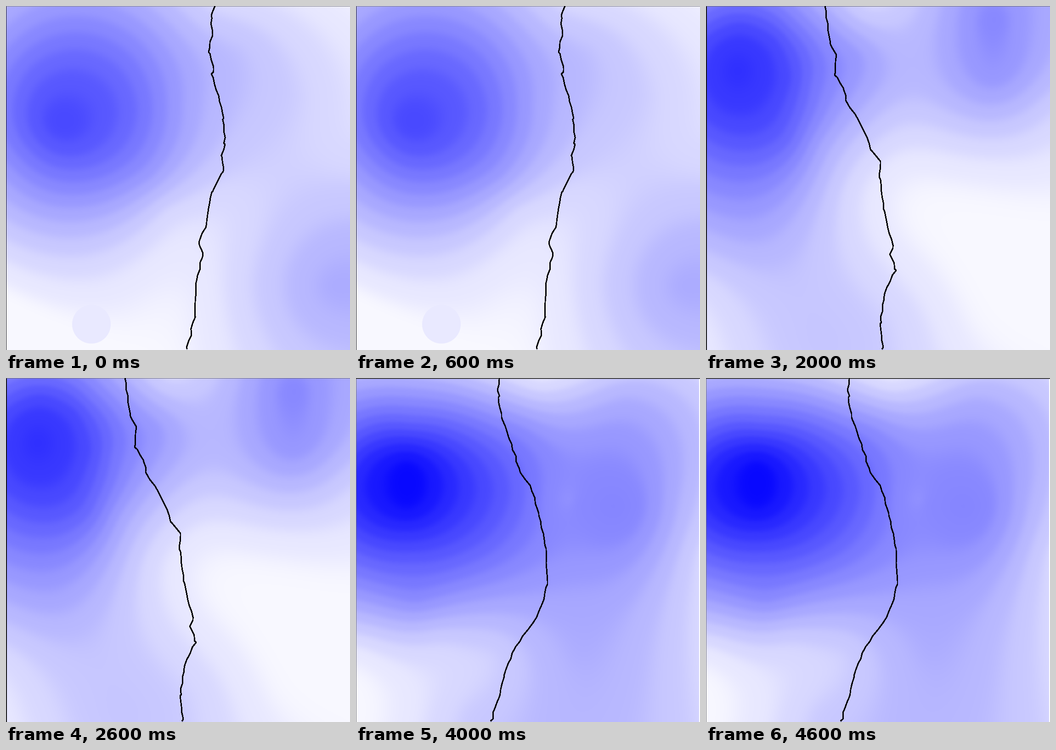
A matplotlib script for the animation above (5 s loop, 749 by 748 pixels).

```python
import numpy as np
import matplotlib.pyplot as plt
from matplotlib.animation import FuncAnimation
from matplotlib.patches import Circle

W, H, DPI = 749, 748, 100
STEP = 16  # spacing of the soft colour terraces

rng = np.random.default_rng(4)
scenes = []


def ring(cx, cy, rx, ry, shade, tilt=0.0):
    """Eight points of equal shade on an ellipse."""
    a = np.arange(8) * np.pi / 4
    u, v = rx * np.cos(a), ry * np.sin(a)
    x = cx + u * np.cos(tilt) - v * np.sin(tilt)
    y = cy + u * np.sin(tilt) + v * np.cos(tilt)
    return np.c_[x, y, np.full(8, shade)]


def kernel(r2):
    return r2 * np.log(r2 + 1e-9)


def surface(p):
    """Thin-plate surface through (x, y, shade) points."""
    xy, shade = p[:, :2] / W, p[:, 2]
    n = len(p)
    d2 = ((xy[:, None] - xy[None]) ** 2).sum(-1)
    poly = np.c_[np.ones(n), xy]
    a = np.zeros((n + 3, n + 3))
    a[:n, :n] = kernel(d2) + 3e-4 * np.eye(n)
    a[:n, n:], a[n:, :n] = poly, poly.T
    c = np.linalg.solve(a, np.r_[shade, 0, 0, 0])

    gx = (np.arange(W) + 0.5)[None] / W
    gy = (np.arange(H) + 0.5)[:, None] / W
    z = c[n] + c[n + 1] * gx + c[n + 2] * gy
    for (px, py), w in zip(xy, c):
        z = z + w * kernel((gx - px) ** 2 + (gy - py) ** 2)
    return z


def paint(points):
    """Blue-to-white image with gentle terraces."""
    z = np.clip(surface(points), 6, 247)
    z -= 0.65 * STEP / (2 * np.pi) * np.sin(2 * np.pi * (z - 8) / STEP)
    rgb = np.full((H, W, 3), 255.0)
    rgb[..., 0] = rgb[..., 1] = z
    return np.round(rgb).astype(np.uint8)


def roughen(path):
    """Adds small kinks between the corners of a path."""
    x, y = np.array(path, float).T
    ys = np.union1d(y, np.arange(y[0], y[-1], 13))
    xs = np.interp(ys, y, x)
    return xs + np.where(np.isin(ys, y), 0, rng.normal(0, 1.3, len(ys))), ys


def scene(rings, spots, path, top, left=(0, 0), margin=(0, 0), disc=False):
    img = paint(np.vstack([ring(*r) for r in rings] + [spots]))
    right, bottom = margin
    img[:, W - right:] = 255
    img[H - bottom:] = 255
    img[:, :left[0]] = left[1]
    img[:top[0]] = top[1]
    scenes.append((img, roughen(path), disc))


scene(
    [(132, 245, 48, 45, 80), (150, 225, 135, 130, 112),
     (155, 212, 230, 226, 160)],
    [(0, 610, 240), (250, 690, 242), (350, 440, 208), (440, 200, 178),
     (450, 0, 211), (510, 90, 194), (749, 0, 239), (640, 200, 208),
     (470, 430, 218), (749, 280, 221), (705, 610, 174), (749, 745, 190),
     (530, 600, 210), (390, 650, 239)],
    [(455, 0), (447, 20), (450, 62), (441, 100), (452, 135), (447, 148),
     (463, 195), (474, 244), (477, 300), (470, 328), (473, 360), (448, 405),
     (437, 470), (420, 514), (429, 537), (413, 605), (411, 675), (394, 745)],
    top=(1, 130), left=(1, 20), disc=True)

scene(
    [(190, 108, 45, 42, 80), (215, 120, 175, 140, 112)],
    [(0, 0, 150), (0, 300, 164), (120, 320, 124), (600, 45, 120),
     (450, 145, 125), (749, 0, 192), (600, 200, 168), (740, 300, 228),
     (500, 260, 167), (390, 300, 176), (0, 430, 194), (150, 490, 199),
     (150, 630, 228), (400, 400, 206), (500, 510, 216), (700, 400, 240),
     (400, 610, 226), (740, 740, 243), (170, 725, 240)],
    [(319, 0), (319, 45), (326, 58), (324, 80), (333, 124), (360, 185),
     (382, 240), (379, 260), (393, 288), (393, 330), (409, 380), (414, 408),
     (412, 454), (403, 495), (420, 551), (407, 635), (396, 656), (386, 714),
     (386, 745)],
    top=(2, 75), margin=(4, 2))

scene(
    [(72, 148, 66, 74, 60), (75, 158, 110, 122, 80),
     (75, 172, 153, 175, 112), (625, 55, 55, 100, 152)],
    [(630, 25, 137), (330, 110, 156), (350, 0, 209), (100, 500, 172),
     (0, 620, 218), (160, 600, 195), (245, 730, 196), (240, 300, 155),
     (480, 110, 180), (430, 240, 202), (749, 220, 203), (620, 350, 229),
     (749, 400, 239), (430, 350, 232), (310, 400, 213), (460, 450, 244),
     (420, 670, 214), (590, 690, 242), (749, 740, 247)],
    [(259, 0), (271, 84), (284, 107), (280, 150), (300, 180), (304, 204),
     (338, 260), (361, 315), (380, 338), (377, 371), (389, 447), (407, 527),
     (400, 540), (414, 575), (398, 605), (387, 636), (379, 690), (384, 745)],
    top=(1, 110), left=(2, 25))

scene(
    [(420, 545, 125, 84, 62, 0.85), (410, 530, 215, 165, 96, 0.84),
     (385, 510, 290, 205, 128, 0.8)],
    [(250, 190, 166), (250, 110, 208), (250, 0, 240), (0, 0, 238),
     (0, 300, 212), (60, 420, 178), (0, 748, 240), (100, 620, 205),
     (200, 730, 187), (749, 748, 204), (749, 470, 230), (640, 430, 173),
     (500, 220, 191), (420, 20, 245), (680, 220, 230), (749, 0, 242)],
    [(535, 2), (512, 28), (498, 49), (485, 74), (476, 101), (469, 131),
     (485, 207), (502, 224), (526, 277), (522, 293), (562, 340), (585, 425),
     (619, 520), (630, 539), (675, 592), (695, 612), (707, 660), (729, 693),
     (745, 745)],
    top=(2, 55), margin=(4, 2))

scene(
    [(110, 232, 42, 50, 16), (105, 238, 118, 95, 48),
     (120, 250, 215, 152, 96), (130, 265, 335, 222, 144),
     (550, 275, 64, 66, 138)],
    [(0, 0, 178), (400, 10, 221), (550, 130, 151), (580, 40, 178),
     (749, 0, 210), (690, 260, 170), (749, 380, 211), (480, 460, 161),
     (480, 600, 175), (180, 560, 200), (0, 600, 231), (0, 730, 247),
     (300, 600, 206), (240, 730, 206), (440, 740, 183), (749, 640, 213)],
    [(312, 0), (310, 42), (317, 85), (339, 144), (357, 203), (380, 236),
     (398, 295), (414, 371), (417, 449), (404, 494), (385, 533), (363, 561),
     (346, 588), (332, 619), (322, 648), (311, 696), (294, 745)],
    top=(2, 65), left=(1, 120), margin=(2, 0))

fig = plt.figure(figsize=(W / DPI, H / DPI), dpi=DPI)
ax = fig.add_axes([0, 0, 1, 1])
ax.set_axis_off()
field = ax.imshow(scenes[0][0], extent=(0, W, H, 0), aspect="auto",
                  interpolation="nearest")
spot = ax.add_patch(Circle((186, 692), 42, color="#e9e9ff", lw=0))
crack, = ax.plot([], [], color="black", lw=1.8 * 72 / DPI, antialiased=False)
ax.set(xlim=(0, W), ylim=(H, 0))


def draw(i):
    img, path, disc = scenes[i]
    field.set_data(img)
    spot.set_visible(disc)
    crack.set_data(*path)
    return field, spot, crack


anim = FuncAnimation(fig, draw, frames=len(scenes), interval=1000,
                     repeat=True, repeat_delay=0)
plt.show()
```
